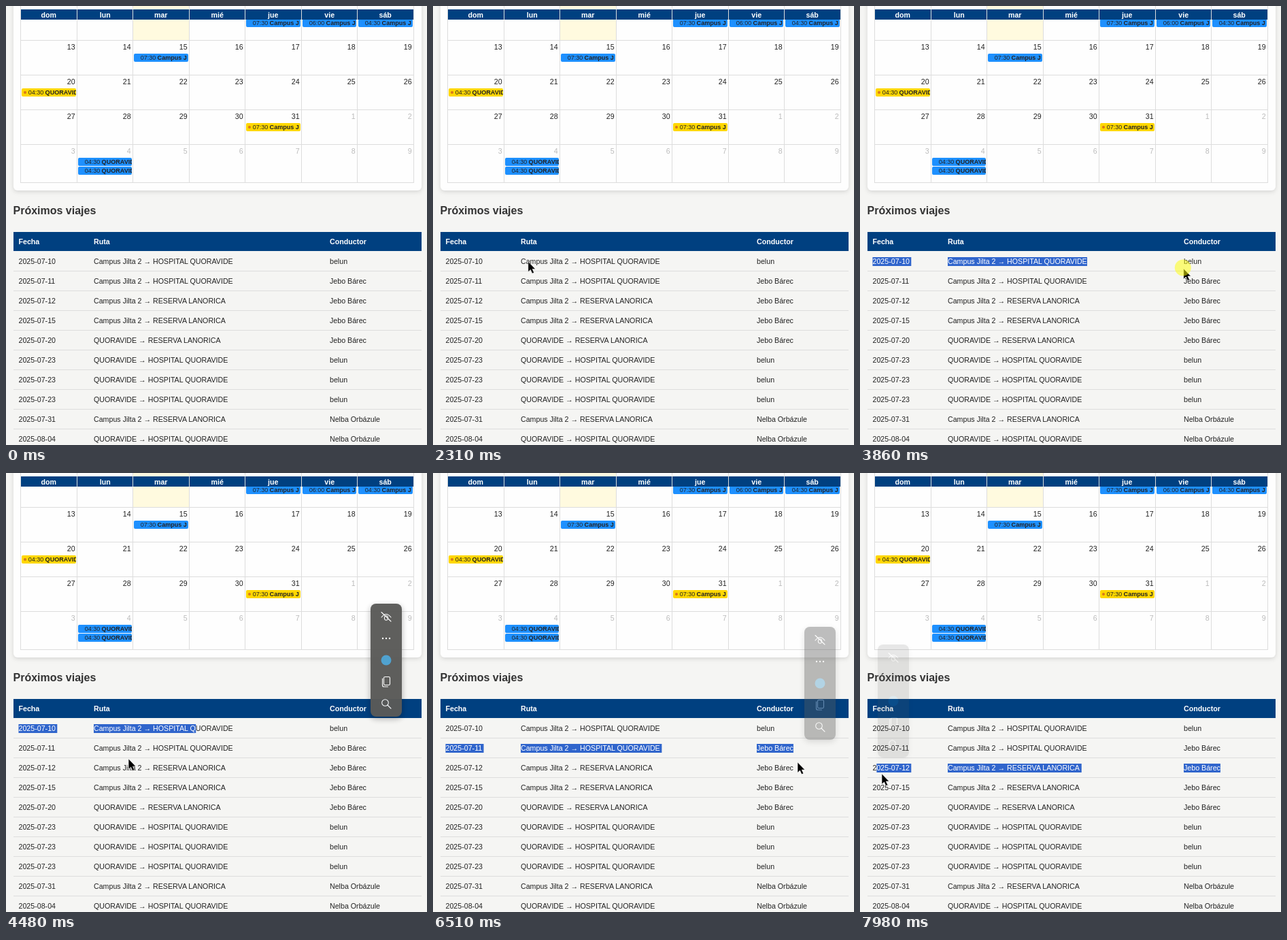
These frames come from a looping animation (619 by 645 pixels, 8 s). An HTML page:

```html
<!DOCTYPE html>
<html lang="es">
<head>
<meta charset="utf-8">
<title>Próximos viajes</title>
<style>
  html, body { margin: 0; width: 100%; height: 100%; overflow: hidden; background: #f5f5f3; }
  svg { display: block; }
  #stage { width: 100vw; height: 100vh; }
  text { font: 10.67px "Liberation Sans", Arial, sans-serif; fill: #222; white-space: pre; }
  .bold { font-weight: bold; }
  .title { font-size: 16px; font-weight: bold; fill: #333; }
  .light, .selection text { fill: #fff; }
  .faded { opacity: .3; }
  .event text { font-size: 9.07px; }
  .selection rect { fill: #3065cc; }
  .card { fill: #fefefe; filter: drop-shadow(0 2px 3px rgba(0, 0, 0, .13)); }
  .menu { filter: drop-shadow(0 3px 5px rgba(0, 0, 0, .3)); }
  .icon { fill: none; stroke: #fff; stroke-width: 1.1; stroke-linecap: round; stroke-linejoin: round; }
</style>
</head>
<body>
<svg id="stage" viewBox="0 0 619 645" preserveAspectRatio="none"></svg>
<script>
const LOOP = 8000;
const NAVY = '#004080', LINE = '#ddd', BLUE = '#1e90ff', GOLD = '#ffd700';
const stage = document.getElementById('stage');

const rect = (x, y, w, h, fill, extra = '') =>
  `<rect x="${x}" y="${y}" width="${w}" height="${h}" fill="${fill}" ${extra}/>`;
const label = (x, y, str, cls = '', extra = '') =>
  `<text x="${x}" y="${y}" class="${cls}" ${extra}>${str}</text>`;

// Calendar
const colX = i => Math.floor(21.7 + i * 82.5);
const rowY = i => -1 + i * 51;
const days = ['dom', 'lun', 'mar', 'mié', 'jue', 'vie', 'sáb'];

function calendarEvent(col, row, time, name, color = BLUE, slot = 0) {
  const x = colX(col) + 2, w = colX(col + 1) - 1 - x;
  return `<svg class="event" x="${x}" y="${rowY(row) + 20 + slot * 13}" width="${w}" height="12">
    ${rect(0, 0, w, 12, color, 'rx="2"')}
    <circle cx="5" cy="6" r="2" fill="${color === GOLD ? '#d9771c' : BLUE}"/>
    ${label(9.7, 9.2, time)}${label(34.6, 9.2, name, 'bold')}</svg>`;
}

function calendar() {
  let out = '<rect class="card" x="11" y="-20" width="600" height="291" rx="6"/>';
  out += rect(colX(2) + 1, 0, 82, 50, '#fffadf');
  for (let i = 0; i < 8; i++) out += rect(colX(i), 0, 1, 260, LINE);
  for (const y of [50, 101, 152, 203, 259]) out += rect(21, y, 579, 1, LINE);

  for (let i = 0; i < 28; i++) {
    const row = 1 + Math.floor(i / 7), day = 13 + i;
    const cls = day > 31 ? 'faded' : '';
    out += label(colX(i % 7 + 1) - 2.3, rowY(row) + 14, day > 31 ? day - 31 : day, cls, 'text-anchor="end"');
  }

  const campus = 'Campus J', town = 'QUORAVIDE';
  out += calendarEvent(4, 0, '07:30', campus) + calendarEvent(5, 0, '06:00', campus)
    + calendarEvent(6, 0, '04:30', campus) + calendarEvent(2, 1, '07:30', campus)
    + calendarEvent(0, 2, '04:30', town, GOLD) + calendarEvent(4, 3, '07:30', campus, GOLD)
    + calendarEvent(1, 4, '04:30', town) + calendarEvent(1, 4, '04:30', town, BLUE, 1);

  out += rect(21, 5, 579, 15, NAVY);
  days.forEach((day, i) => {
    out += rect(colX(i), 5, 1, 15, LINE);
    out += label(colX(i) + 41.7, 17, day, 'bold light', 'text-anchor="middle"');
  });
  return out + rect(599, 5, 1, 15, LINE);
}

// Trip table
const cellX = [18.5, 129, 476];
const campus = 'Campus Jilta 2', town = 'QUORAVIDE';
const hospital = 'HOSPITAL QUORAVIDE', reserve = 'RESERVA LANORICA';
const drivers = ['belun', 'Jebo Bárec', 'Nelba Orbázule'];
const trips = [
  ['07-10', campus, hospital, 0], ['07-11', campus, hospital, 1],
  ['07-12', campus, reserve, 1], ['07-15', campus, reserve, 1],
  ['07-20', town, reserve, 1], ['07-23', town, hospital, 0],
  ['07-23', town, hospital, 0], ['07-23', town, hospital, 0],
  ['07-31', campus, reserve, 2], ['08-04', town, hospital, 2]
].map(([date, from, to, driver]) => ['2025-' + date, `${from} → ${to}`, drivers[driver]]);
const baseline = row => 379 + row * 29;
const cells = (texts, y, cls) => texts.map((str, i) => label(cellX[i], y, str, cls)).join('');

function table() {
  let out = label(10.5, 306, 'Próximos viajes', 'title') + rect(11, 332, 600, 28, NAVY);
  out += cells(['Fecha', 'Ruta', 'Conductor'], 350, 'bold light');
  trips.forEach((trip, i) => {
    out += cells(trip, baseline(i)) + rect(11, baseline(i) + 10, 600, 1, LINE);
  });
  return out;
}

// Text selection: each drag snaps to the character edges of its row
const pen = document.createElement('canvas').getContext('2d');
pen.font = '10.67px "Liberation Sans", Arial, sans-serif';
const textWidth = str => pen.measureText(str).width;

const drags = [
  { row: 0, press: 3100, release: 4040 },
  { row: 1, press: 5270, release: 6180 },
  { row: 2, press: 7190, release: 7650, backward: true }
];
for (const drag of drags) {
  drag.edges = trips[drag.row].flatMap((str, i) =>
    Array.from({ length: str.length + 1 }, (_, n) => cellX[i] + textWidth(str.slice(0, n))));
}

function selection(drag, i) {
  const y = baseline(drag.row), trip = trips[drag.row];
  const boxes = trip.map((str, c) =>
    rect(cellX[c], y - 10, textWidth(str) + (c < 2 ? 2.3 : 0), 13, ''));
  return `<clipPath id="clip${i}"><rect y="${y - 12}" height="18"/></clipPath>
    <g class="selection" clip-path="url(#clip${i})">${boxes.join('')}${cells(trip, y)}</g>`;
}

// Floating menu
const menus = [
  { x: 536, y: 192, show: 4340, hide: 4600 },
  { x: 546, y: 226, show: 6455, hide: 6950 },
  { x: 26, y: 252, show: 7962, hide: LOOP }
];

function menu({ x, y }) {
  return `<g class="menu" transform="translate(${x} ${y})" opacity="0">
    ${rect(0, 0, 46, 166, '#5a5a58', 'rx="8"')}
    <g class="icon">
      <path d="M16 20q7-9 14 0M20.5 21a2.6 2.6 0 1 0 5 0a2.6 2.6 0 1 0-5 0M16 12.500l14 13.500"/>
      <rect x="19.500" y="107.500" width="9" height="12" rx="1.800"/>
      <path d="M17.500 110v10q0 2 2 2h6"/>
      <circle cx="21.500" cy="145.500" r="4.800"/><path d="M25 149l5 5"/>
    </g>
    <g fill="#fff"><circle cx="18" cy="51" r="1.200"/><circle cx="23" cy="51" r="1.200"/><circle cx="28" cy="51" r="1.200"/></g>
    <circle cx="23" cy="83" r="7.500" fill="#4ba0cf"/></g>`;
}

stage.innerHTML = calendar() + table() + drags.map(selection).join('') + menus.map(menu).join('')
  + `<g id="pointer">
      <path d="M0 0V15.200L3.500 12L6 17.500L8.600 16.300L6.200 11H10.600Z" stroke="#fff" stroke-width=".5"/>
      <circle id="press" cx="-1" cy="-1.500" r="12" fill="#ff0" opacity=".5"/>
    </g>`;

const pointer = document.getElementById('pointer');
const press = document.getElementById('press');
const clipRects = drags.map((_, i) => document.querySelector(`#clip${i} rect`));
const menuNodes = document.querySelectorAll('.menu');

// Pointer path: time, x, y
const path = [
  [0, 585, 665], [590, 585, 650], [750, 606, 520], [950, 540, 380], [1120, 330, 310],
  [1270, 153, 298], [1390, 72, 336], [1530, 24, 440], [1670, 80, 600], [1790, 210, 632],
  [2000, 488, 520], [2140, 410, 385], [2250, 260, 356], [2400, 16, 440], [2560, 200, 618],
  [2720, 520, 500], [2840, 330, 390], [2970, 14, 376], [3100, 14, 376], [3300, 79, 378],
  [3890, 487, 386], [4040, 521, 374], [4340, 521, 374], [4480, 181, 420], [4700, 60, 417],
  [5110, 18, 406], [5270, 18, 406], [5690, 422, 409], [6070, 531, 406], [6450, 531, 406],
  [6510, 536, 425], [6750, 543, 440], [7190, 532, 433], [7640, 11, 432], [7820, 11, 432],
  [7980, 32, 442], [8000, 33, 443]
];

// Monotone cubic interpolation, so the pointer never overshoots a rest
function slope(i, axis) {
  if (i < 1 || i >= path.length - 1) return 0;
  const rate = k => (path[k + 1][axis] - path[k][axis]) / (path[k + 1][0] - path[k][0]);
  const a = rate(i - 1), b = rate(i);
  return a * b > 0 ? 2 * a * b / (a + b) : 0;
}

function pointerAt(t, axis) {
  let i = 0;
  while (i < path.length - 2 && path[i + 1][0] <= t) i++;
  const span = path[i + 1][0] - path[i][0], u = (t - path[i][0]) / span;
  const from = path[i][axis], to = path[i + 1][axis];
  const ease = u * u * (3 - 2 * u);
  return from + (to - from) * ease
    + span * u * (1 - u) * ((1 - u) * slope(i, axis) - u * slope(i + 1, axis));
}

const clamp = v => Math.max(0, Math.min(1, v));

function render(t) {
  pointer.setAttribute('transform', `translate(${pointerAt(t, 1)} ${pointerAt(t, 2)})`);
  press.style.display = drags.some(d => t >= d.press && t < d.release) ? '' : 'none';

  drags.forEach((drag, i) => {
    const next = drags[i + 1];
    const active = t >= drag.press && (!next || t < next.press);
    let left = 0, right = 0;
    if (active) {
      const x = pointerAt(Math.max(drag.press, t - 45), 1);
      if (drag.backward) {
        left = drag.edges.find(edge => edge >= x - 3) ?? 540;
        right = 540;
      } else {
        right = drag.edges.filter(edge => edge <= x + 1).pop() ?? 0;
      }
    }
    clipRects[i].setAttribute('x', left);
    clipRects[i].setAttribute('width', right - left);
  });

  menus.forEach((m, i) => {
    const opacity = clamp((t - m.show) / 140) * (1 - clamp((t - m.hide) / 220));
    menuNodes[i].setAttribute('opacity', opacity * 0.97);
  });
}

const start = performance.now();
function tick() {
  render((performance.now() - start) % LOOP);
  requestAnimationFrame(tick);
}
tick();
</script>
</body>
</html>
```
